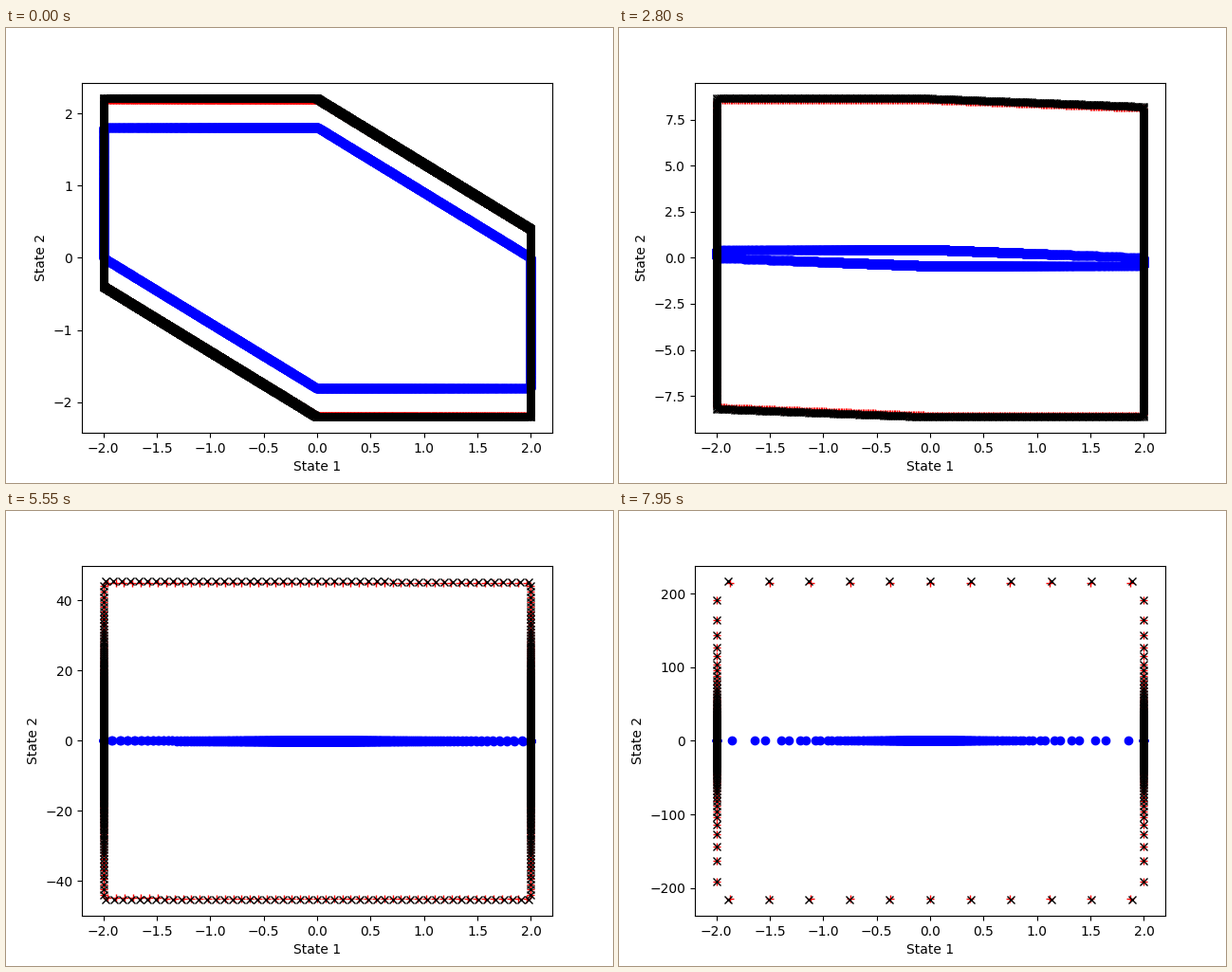
These frames come from a looping animation (640 by 480 pixels, 8 s). A matplotlib script:

```python
import numpy as np
import matplotlib.pyplot as plt
from matplotlib.animation import FuncAnimation

TICK = 50                 # ms
LOOP = 8000               # ms
SLOW_END = 3600           # steps take 200 ms before this time, 150 ms after
GROW = 1.05 ** 2          # growth of the outer set per step
SHRINK = 0.9045           # decay of the inner set per step

theta = np.linspace(0, 2 * np.pi, 3600, endpoint=False)
cos, sin = np.cos(theta), np.sin(theta)


def boundary(height, slope):
    """Hexagon |x| <= 2, |y| <= height, |y + slope x| <= height, by angle."""
    gauge = np.maximum.reduce([
        np.abs(cos) / 2,
        np.abs(sin) / height,
        np.abs(sin + slope * cos) / height,
    ])
    return cos / gauge, sin / gauge


def step_at(ms):
    if ms < SLOW_END:
        return ms // 200
    return SLOW_END // 200 + (ms - SLOW_END) // 150


fig, ax = plt.subplots(figsize=(6.4, 4.8), dpi=100)
ax.set_xlabel("State 1")
ax.set_ylabel("State 2")
ax.set_xlim(-2.2, 2.2)
inner, = ax.plot([], [], "bo")
approx, = ax.plot([], [], "r+")
outer, = ax.plot([], [], "kx")


def update(i):
    m = step_at(i * TICK) + 1
    low = 2 * SHRINK ** m
    high = 2 * GROW ** m
    for line, height in ((inner, low), (approx, 0.99 * high), (outer, high)):
        line.set_data(*boundary(height, low / 2))
    ax.set_ylim(-1.1 * high, 1.1 * high)
    return inner, approx, outer


anim = FuncAnimation(fig, update, frames=LOOP // TICK, interval=TICK,
                     repeat=True, repeat_delay=0, blit=False)
plt.show()
```
